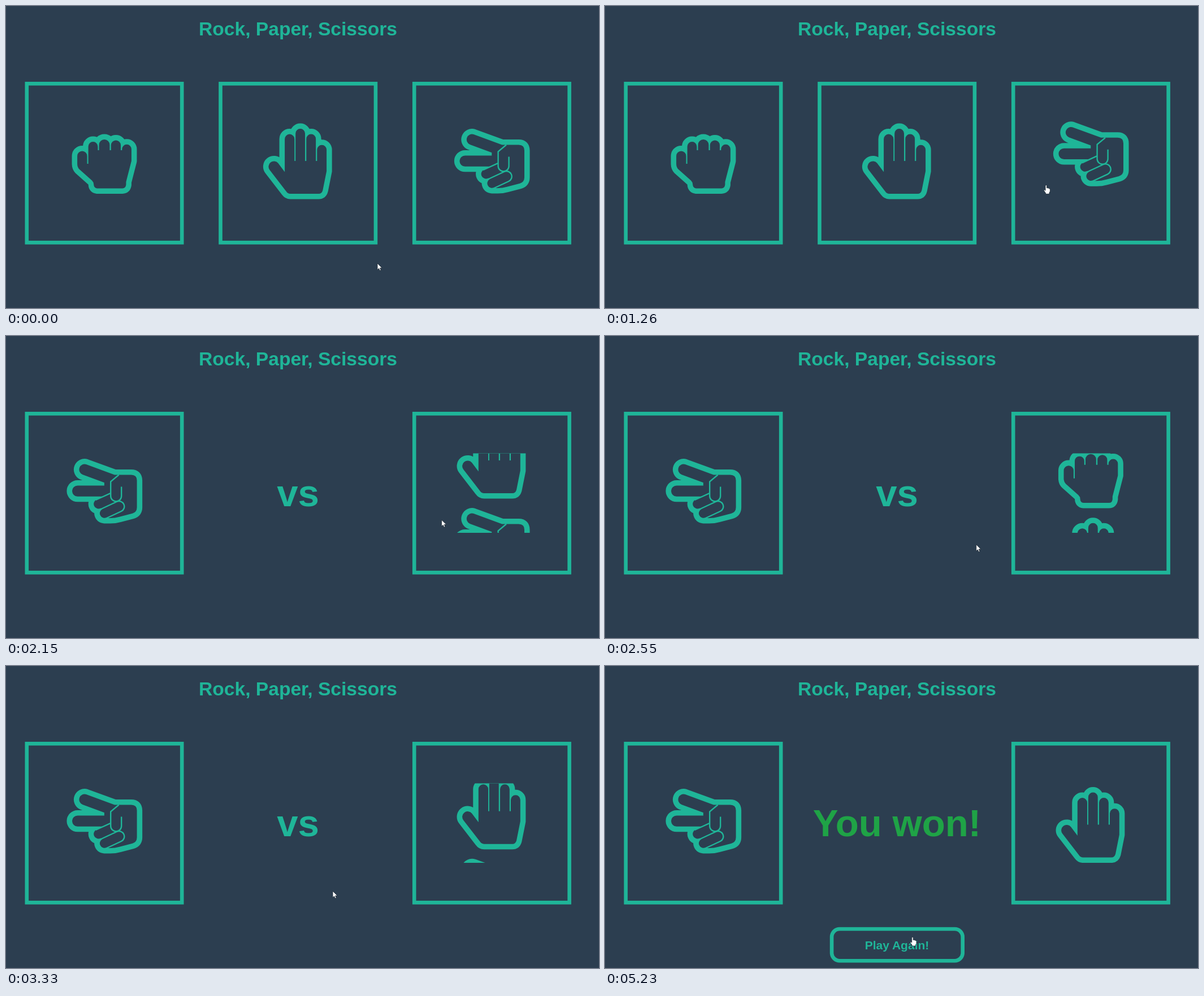
Write an HTML page that moves like this. It is 1049x534 px and loops after 5.41 s.

```html
<!DOCTYPE html>
<html lang="en">
<head>
<meta charset="utf-8">
<title>Rock, Paper, Scissors</title>
<style>
  html, body { margin: 0; width: 100%; height: 100%; overflow: hidden; background: #2c3e50; }
  svg { display: block; width: 1049px; height: 534px; }
  text { font-family: "Liberation Sans", Arial, sans-serif; font-weight: bold; text-anchor: middle; fill: #1fb598; }
  .box { fill: none; stroke: #1fb598; stroke-width: 6.6; }
  .rim { fill: #1fb598; stroke: #1fb598; stroke-width: 19.1; stroke-linejoin: round; }
  .hole { fill: #2c3e50; }
  .thin { fill: none; stroke: #1fb598; stroke-width: 2.4; }
  .cursor { fill: #fff; stroke: #1c2833; stroke-width: .8; stroke-linejoin: round; }
</style>
</head>
<body>
<svg viewBox="0 0 1049 534">
  <defs id="defs">
    <clipPath id="reel"><rect x="726" y="207.5" width="267" height="140.6"/></clipPath>
  </defs>
  <text x="516.5" y="52.3" font-size="33.6">Rock, Paper, Scissors</text>
  <rect class="box" x="36.8" y="137.3" width="274.4" height="281"/>
  <rect class="box" x="722.2" y="137.3" width="274.4" height="281"/>

  <g id="pick">
    <rect class="box" x="379.5" y="137.3" width="274.4" height="281"/>
    <use href="#rock"/>
    <use href="#paper" id="midHand"/>
    <use href="#scissors" id="rightHand"/>
  </g>

  <g id="duel">
    <use href="#scissors" x="-685.4"/>
    <text id="versus" x="516.5" y="301" font-size="67.2">vs</text>
    <g clip-path="url(#reel)"><g id="strip"></g></g>
  </g>

  <g id="win">
    <text x="516.5" y="301" font-size="67.2" style="fill:#1fa346">You won!</text>
    <rect class="box" x="401.1" y="465" width="231.6" height="56.2" rx="14"/>
    <text x="516.5" y="500.5" font-size="21">Play Again!</text>
  </g>

  <g id="mouse">
    <circle id="press" r="7.8" fill="#ff0" fill-opacity=".47"/>
    <path id="arrow" class="cursor" d="M0 0V11.4L2.6 9 4.4 13 6.3 12.2 4.6 8.2H8.2Z"/>
    <path id="finger" class="cursor" d="M-1.3 1.2Q0 -.6 1.2 1.2V5.4Q2.6 4.8 3.3 5.8 4.6 5.3 5.2 6.4 6.9 6.2 7 8V11.4L5.6 14V16H-.8V14.6L-3.8 10.2Q-4.4 8.6 -3.2 8.4L-1.3 10Z"/>
  </g>
</svg>
<script>
const LOOP = 5410, PICKED = 1500, WON = 3650, PITCH = 141;
const $ = id => document.getElementById(id);
const show = (id, on) => $(id).setAttribute("display", on ? "inline" : "none");

// Inside of an upright finger: middle, top, bottom and half width.
const tip = (x, top, bottom, r) =>
  `M${x - r} ${bottom}V${top + r}A${r} ${r} 0 0 1 ${x + r} ${top + r}V${bottom}Z`;

// Inside of a slanted finger between two centres.
function capsule(x1, y1, x2, y2, r) {
  const d = Math.hypot(x2 - x1, y2 - y1);
  const nx = (y2 - y1) / d * r, ny = (x1 - x2) / d * r;
  return `M${x1 + nx} ${y1 + ny}L${x2 + nx} ${y2 + ny}A${r} ${r} 0 0 1 ${x2 - nx} ${y2 - ny}` +
    `L${x1 - nx} ${y1 - ny}A${r} ${r} 0 0 1 ${x1 + nx} ${y1 + ny}Z`;
}

// A hand is its inside, thickened by the rim, plus thin inner lines.
const hand = (id, inside, lines = "") =>
  `<g id="${id}"><path class="rim" d="${inside}"/><path class="hole" d="${inside}"/>` +
  `<path class="thin" d="${lines}"/></g>`;

const rock = tip(134.8, 256.5, 280, 8.7) + tip(154, 240, 256, 8.4) + tip(174, 236, 256, 9.4) +
  tip(194.4, 237.5, 256, 8.6) + tip(213.6, 244.8, 256, 8.3) +
  "M145.6 255H221.9V274L212.4 311V316Q211.6 322.4 206 322.4H161Q155.4 322 155.2 315.5" +
  "Q155.2 311.5 152 308.5L129.5 288.5Q126.1 285 126.1 279H145.6Z";

const paper = tip(501.7, 226.6, 275, 8.6) + tip(520.6, 217.1, 275, 8.4) +
  tip(539.7, 226.6, 275, 8.4) + tip(558.7, 245.7, 275, 8.4) +
  "M493.1 274H567.1V292L560.3 326Q558.6 332 553 332H503Q498.6 332 496 328.2L466.5 290" +
  "A9.55 9.55 0 0 1 481.5 278.1L493.1 293.5Z";

const pinky = [859.5, 313.5, 885.3, 301.5];
const scissors = "M820.7 244.9A9.5 9.5 0 0 1 827.3 227.1L877.5 245.5H907Q917 245.5 917 255.5V303" +
  "Q917 311.5 909 313.7L886 319.8Q878 322 870 322H859.5V313.5L849 297L858 283.7H812" +
  "A9.6 9.6 0 0 1 812 264.5H859.3V259.3Z" +
  capsule(849, 297, 874, 285.6, 8.4) + capsule(...pinky, 8.4);
const folds = "M844 290L871 277.6M885 245.5L870.6 257.5V283A9.5 9.5 0 0 0 889.6 283V266.5" +
  capsule(...pinky, 9.4);

$("defs").innerHTML += hand("rock", rock) + hand("paper", paper) + hand("scissors", scissors, folds);

const column = { rock: 685.4, paper: 342.7, scissors: 0 };
$("strip").innerHTML = ["scissors", "paper", "rock", "scissors", "paper"]
  .map((name, i) => `<use href="#${name}" x="${column[name]}" y="${6.5 - i * PITCH}"/>`).join("");

// Keys are [time, value, ...]; values run straight between them.
function along(keys, t) {
  const i = keys.findIndex(k => k[0] > t);
  if (i < 0) return keys[keys.length - 1].slice(1);
  if (!i) return keys[0].slice(1);
  const a = keys[i - 1], b = keys[i], f = (t - a[0]) / (b[0] - a[0]);
  return a.slice(1).map((v, j) => v + (b[j + 1] - v) * f);
}

// cubic-bezier(.42, 0, .58, 1)
function easeInOut(x) {
  let lo = 0, hi = 1;
  for (let i = 0; i < 24; i++) {
    const s = (lo + hi) / 2, r = 1 - s;
    if (1.26 * s * r * r + 1.74 * s * s * r + s * s * s < x) lo = s; else hi = s;
  }
  return lo * lo * (3 - 2 * lo);
}

const route = [
  [0, 657, 455], [40, 657, 455], [130, 640, 400], [330, 652, 345], [500, 723, 334],
  [560, 757, 323], [820, 781, 317], [1500, 780, 316], [1700, 780, 316], [2150, 771, 325],
  [2290, 716, 348], [2880, 582, 395], [2930, 580, 397], [3330, 578, 398],
  [4070, 578, 398], [4460, 544, 479]
];
const spin = [
  [PICKED, 0], [1650, .076], [2150, .262], [2930, .657], [3330, .854], [3470, .968], [3520, 1]
];
const midLift = [[80, 0], [220, 12.5], [340, 12.5], [500, 0]];
const rightLift = [[500, 0], [700, 12.7]];

const inside = (x, y, l, t, r, b) => x >= l && x <= r && y >= t && y <= b;

function draw(t) {
  const picking = t < PICKED, won = t >= WON;
  show("pick", picking);
  show("duel", !picking);
  show("versus", !won);
  show("win", won);
  $("midHand").setAttribute("y", -along(midLift, t)[0]);
  $("rightHand").setAttribute("y", -along(rightLift, t)[0]);
  $("strip").setAttribute("transform", `translate(0 ${4 * PITCH * easeInOut(along(spin, t)[0])})`);

  const [x, y] = along(route, t);
  const link = picking
    ? [33.5, 376.2, 718.9].some(l => inside(x, y, l, 134, l + 281, 421.6))
    : won && inside(x, y, 398, 462, 636, 524);
  $("mouse").setAttribute("transform", `translate(${x} ${y})`);
  show("finger", link);
  show("arrow", !link);
  show("press", t >= 5160 && t < 5230);
}

function tick(now) {
  draw(now % LOOP);
  requestAnimationFrame(tick);
}
draw(0);
requestAnimationFrame(tick);
</script>
</body>
</html>
```
